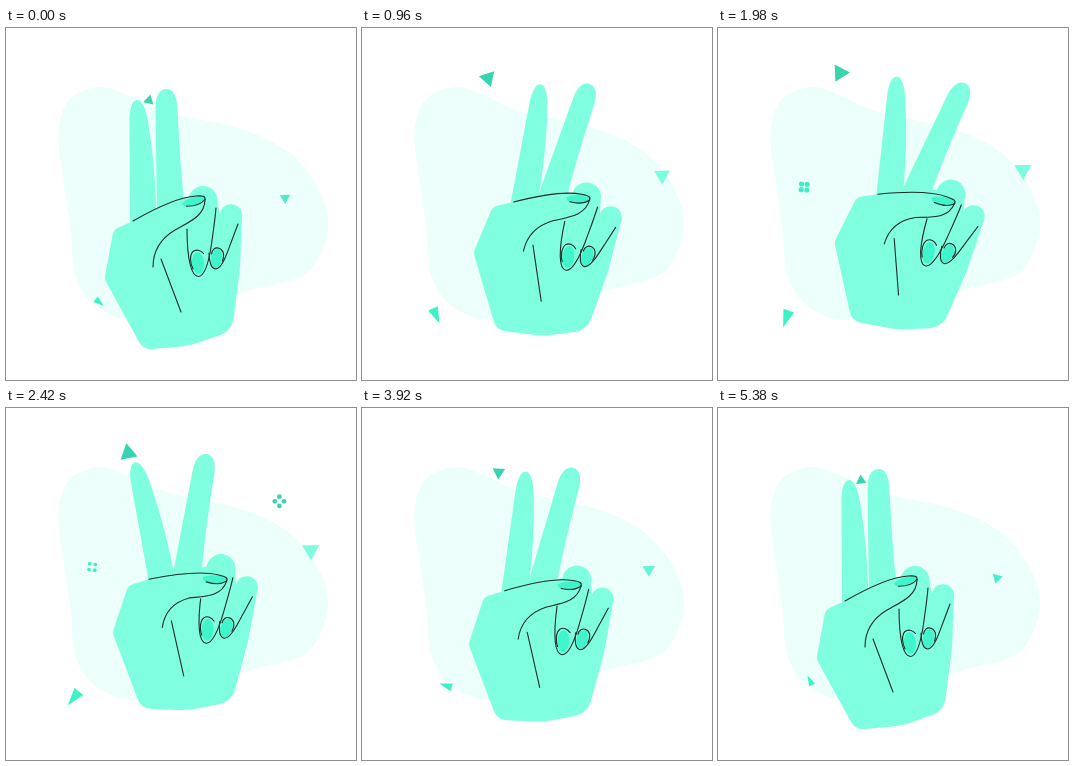
Write an HTML page with a canvas that moves like this. It is 350x352 px and loops after 5.4 s.

```html
<!DOCTYPE html>
<html lang="en">
<head>
<meta charset="utf-8">
<title>Victory hand</title>
<style>
  html, body { margin: 0; width: 100%; height: 100%; overflow: hidden; background: #fff; }
  canvas { display: block; width: 350px; height: 352px; }
</style>
</head>
<body>
<canvas id="stage"></canvas>
<script>
const W = 350, H = 352, LOOP = 5400, RAD = Math.PI / 180;
const SKIN = '#7fffdf', NAIL = '#40f5cc', INK = '#1c2b28', CLOUD = '#ecfffb', TEAL = '#38d4ae';

const canvas = document.getElementById('stage');
const dpr = window.devicePixelRatio || 1;
canvas.width = W * dpr;
canvas.height = H * dpr;
const ctx = canvas.getContext('2d');

const mix = (a, b, k) => a + (b - a) * k;
const progress = (t, from, to) => Math.min(1, Math.max(0, (t - from) / (to - from)));
const smooth = u => u * u * (3 - 2 * u);
const ease = (t, from, to) => smooth(progress(t, from, to));

// Rest, lean right, lean left, lean right again, rest
const BEATS = [300, 1580, 2420, 3260, 4900];
function swing(t, ...poses) {
  const values = [0, ...poses, 0];
  return values.slice(1).reduce((v, next, i) => mix(v, next, ease(t, BEATS[i], BEATS[i + 1])), 0);
}

function spin([px, py], deg, [x, y]) {
  const c = Math.cos(deg * RAD), s = Math.sin(deg * RAD), dx = x - px, dy = y - py;
  return [px + dx * c - dy * s, py + dx * s + dy * c];
}

function turned([px, py], deg, draw, stretch = 1) {
  ctx.save();
  ctx.translate(px, py);
  ctx.rotate(deg * RAD);
  ctx.scale(stretch, 1);
  ctx.translate(-px, -py);
  draw();
  ctx.restore();
}

function fill(d, color) {
  ctx.fillStyle = color;
  ctx.fill(typeof d === 'string' ? new Path2D(d) : d);
}

function stroke(d) {
  ctx.strokeStyle = INK;
  ctx.lineWidth = 1.1;
  ctx.lineCap = ctx.lineJoin = 'round';
  ctx.stroke(new Path2D(d));
}

function disc(x, y, rx, color, ry = rx, tilt = 0) {
  ctx.beginPath();
  ctx.ellipse(x, y, rx, ry, tilt, 0, Math.PI * 2);
  ctx.fillStyle = color;
  ctx.fill();
}

// Closed smooth curve through points
function blob(pts) {
  const n = pts.length, p = new Path2D(), at = i => pts[(i + n) % n];
  p.moveTo(...pts[0]);
  for (let i = 0; i < n; i++) {
    const a = at(i - 1), b = at(i), c = at(i + 1), e = at(i + 2);
    p.bezierCurveTo(b[0] + (c[0] - a[0]) / 6, b[1] + (c[1] - a[1]) / 6,
      c[0] - (e[0] - b[0]) / 6, c[1] - (e[1] - b[1]) / 6, c[0], c[1]);
  }
  return p;
}

// Polygon of [x, y, corner radius]
function rounded(pts) {
  const p = new Path2D(), n = pts.length;
  p.moveTo(pts[0][0], pts[0][1]);
  for (let i = 1; i < n; i++) {
    const [x, y, r = 0] = pts[i], next = pts[(i + 1) % n];
    p.arcTo(x, y, next[0], next[1], r);
  }
  p.closePath();
  return p;
}

const cloud = blob([
  [93, 59], [122, 67], [160, 84], [235, 101], [282, 124], [312, 160], [322, 198],
  [309, 236], [286, 252], [245, 262], [190, 280], [132, 292], [94, 281], [70, 250],
  [64.5, 200], [57, 150], [52.5, 105], [63, 72]
]);
const palm = rounded([
  [127, 193], [107.5, 202, 10], [98.5, 251, 9], [137.500, 322, 14], [184, 317.5, 80],
  [226, 303, 20], [234, 240, 80], [236, 187], [214, 186], [211, 172], [183, 172]
]);

const INDEX = 'M124 202 L123.5 95 C123 82 126 72 131 72 C137 72 141 84 143 100 C147 125 149 150 150 175 L150 200 Z';
const MIDDLE = 'M151 188 L149.5 80 C149.5 67 154 61 160.5 61 C167 61 171 68 171.5 80 C173 115 175 145 178 172 L178 188 Z';
const THUMB_TOP = 'M127 193 C148 181 172 169 190 168 C197 167.5 199.5 168 199 171.5';
const THUMB_NAIL = 'M176 175.5 C180 170.5 190 168 196 168 C199.5 168 199.5 170 198 172.5 C194 177.5 184 179 178 178 Z';

// The thumb bends about its root while the lower crease stays on the palm
function thumb(deg) {
  const root = [127, 193], stretch = 1 + deg * 0.004;
  const pt = (x, y, part = 1) =>
    spin(root, deg * part, [mix(root[0], x, stretch), y]).map(n => n.toFixed(2)).join(' ');
  turned(root, deg, () => {
    fill(THUMB_TOP + ' L190 195 L127 200 Z', SKIN);
    fill(THUMB_NAIL, NAIL);
    stroke(THUMB_TOP);
    stroke('M180.5 178.3 C188 178.3 195 176.5 199 171.5');
  }, stretch);
  stroke(`M${pt(199, 171.5)} C${pt(199, 188)} ${pt(183, 194, 0.85)} ${pt(169, 202, 0.55)} `
    + `C${pt(154, 211, 0.35)} 147 224 147 239`);
}

function foldedFingers() {
  disc(192, 235, 6, NAIL, 11, -0.08);
  disc(210.5, 230.5, 5.6, NAIL, 9.5, 0.15);
  // ring
  stroke('M181 201 C181 215 181.5 225 184 236 C186 244 189 248.5 192.5 248.5 C199 248 203 233 205.5 216 C207 205 209 192 210 180');
  stroke('M187 241 C184 235 183.5 227 187 223.5 C190 221 194.5 222 197.5 225.5');
  // little
  stroke('M203 225 C203 233 205 241 210 241 C217 240 222 222 226 212 L232 196');
  stroke('M205.5 226 C206 221.5 209 219.5 212 220 C217 221 219 226 216.5 233');
}

function hand(t) {
  const lift = ease(t, 100, 1550) - ease(t, 2000, 4900);
  const turn = swing(t, 23.5, 8, 12.3);
  const wag = swing(t, 6.5, -7.2, 7.5);
  const open = swing(t, 18.5, 21.5, 14);
  ctx.save();
  ctx.translate(175 + turn * 0.34, 284 - 17 * lift);
  ctx.rotate(turn * RAD);
  ctx.translate(-175, -284);
  turned([137, 183], wag - open / 2, () => fill(INDEX, SKIN));
  turned([164, 172], wag + open / 2, () => fill(MIDDLE, SKIN));
  fill(palm, SKIN);
  disc(197, 172.5, 14.5, SKIN);
  disc(225, 187.5, 11.2, SKIN);
  foldedFingers();
  thumb(swing(t, 5, 9.5, 7.5));
  stroke('M155 231 L175 284');
  ctx.restore();
}

// Triangle pointing along `deg`; `wing` places the two rear corners
function triangle(home, out, reach, deg, color, tip = 1, wing = 120) {
  const r = 6 + 4 * reach, x = mix(home[0], out[0], reach), y = mix(home[1], out[1], reach);
  ctx.beginPath();
  for (const side of [0, wing, -wing]) {
    const a = (deg + side) * RAD, d = side ? r * (2 - tip) : r * tip;
    ctx.lineTo(x + Math.cos(a) * d, y + Math.sin(a) * d);
  }
  ctx.fillStyle = color;
  ctx.fill();
}

function triangles(t) {
  const reach = 1 - (1 - progress(t, 0, 1700)) ** 2 - ease(t, 2300, 4850);
  const u = t / LOOP, roll = 222 * mix(u, smooth(u), 0.5);
  const tint = [78, 125, 236, 253, 200, 224];
  const pale = [0, 2, 4].map(i => Math.round(mix(tint[i], tint[i + 1], Math.min(1, reach * 1.5))));
  triangle([143, 72.5], [122, 45], reach, 43 + roll, TEAL);
  triangle([279, 170], [305, 142], reach, 88 + 18 * ease(t, 4500, LOOP), `rgb(${pale})`);
  triangle([92.5, 273.5], [68.8, 288.5], reach, 40 + roll * 0.92, '#3df2c6', 1.16, 138);
}

function dots(t, from, to, x, y, size, gap, angle, color) {
  if (t <= from || t >= to) return;
  const r = size * Math.sin(Math.PI * progress(t, from, to));
  for (let i = 0; i < 4; i++) {
    const a = (angle + i * 90) * RAD;
    disc(x + Math.cos(a) * gap, y + Math.sin(a) * gap, r, color);
  }
}

function draw(t) {
  ctx.setTransform(dpr, 0, 0, dpr, 0, 0);
  ctx.fillStyle = '#fff';
  ctx.fillRect(0, 0, W, H);
  fill(cloud, CLOUD);
  triangles(t);
  dots(t, 1150, 2850, 86.2, 159, 2.6, 4, 45 + (t - 1580) * 0.008, '#3fedc4');
  dots(t, 1950, 3450, 273.4, 93.3, 2.8, 4.6, (t - 2420) * 0.0536, TEAL);
  hand(t);
}

const start = performance.now();
function tick() {
  draw((performance.now() - start) % LOOP);
  requestAnimationFrame(tick);
}
tick();
</script>
</body>
</html>
```
